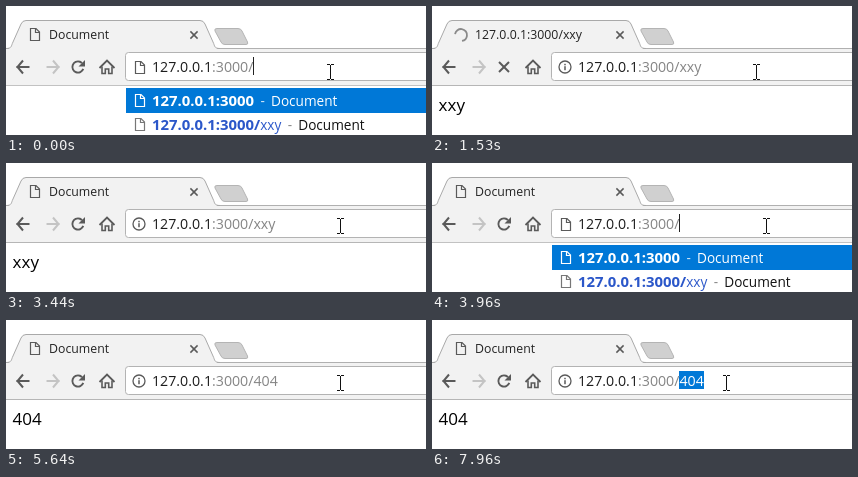
Write an HTML page with a canvas that moves like this. It is 420 by 129 pixels and loops after 8 s.

```html
<!DOCTYPE html>
<html lang="en">
<head>
<meta charset="utf-8">
<title>Address bar</title>
<style>
html, body { margin: 0; width: 420px; height: 129px; overflow: hidden; background: #fff; }
canvas { display: block; width: 420px; height: 129px; }
</style>
</head>
<body>
<canvas id="stage"></canvas>
<script>
const W = 420, H = 129, LOOP = 8000;
const BLUE = '#0078d7', DARK = '#5a5a5a', LINK = '#2b57c9';
const HOST = '127.0.0.1', BASE = HOST + ':3000', TEXT_X = 146;
const SANS = '"Open Sans", "Noto Sans", sans-serif';
const CJK = '"Noto Sans CJK SC", "Noto Sans CJK", sans-serif';
const URL_FONT = '14.2px ' + SANS;
const ROW_FONT = '13.6px ' + SANS;
const BOLD_FONT = 'bold 14.9px ' + SANS;

const canvas = document.getElementById('stage');
const ctx = canvas.getContext('2d');
const dpr = window.devicePixelRatio || 1;
canvas.width = W * dpr;
canvas.height = H * dpr;

const row = (path, title = 'Document') => ({ path, title });
const search = path => ({ path, search: true });
const LONG = row('/xxyssssssssss');

// Each entry overrides part of the state from its time onward.
const cues = [
  [0, { typed: '/', auto: '', rows: [row(''), row('/xxy')], caret: true, sel: null,
        page: '', tab: 'Document', load: false, secure: false, mouse: [324, 58] }],
  [310, { caret: false }],
  [590, { typed: '/x', auto: 'xy', rows: [row('/xxy'), LONG] }],
  [730, { typed: '/xx', auto: 'y' }],
  [880, { typed: '/xxy', auto: '' }],
  [1410, { rows: null, load: true }],
  [1530, { secure: true, tab: BASE + '/xxy', page: 'xxy' }],
  [1650, { load: false, tab: 'Document' }],
  [2490, { sel: [0, 18] }],
  [2630, { mouse: [334, 55] }],
  [2880, { sel: null, caret: true }],
  [3440, { caret: false }],
  [3590, { typed: '/xx', rows: [row('/xx', ''), row('/xxy')], caret: true, secure: false }],
  [3710, { typed: '/x', rows: [row('/x', ''), row('/xxy')] }],
  [3960, { typed: '/', rows: [row(''), row('/xxy')] }],
  [4360, { caret: false }],
  [4730, { typed: '/4', auto: '04', rows: [row('/404'), search('/4')] }],
  [5010, { typed: '/40', auto: '4', rows: [row('/404'), search('/40')] }],
  [5130, { typed: '/404', auto: '', rows: [row('/404'), search('/404')], caret: true }],
  [5380, { rows: null, caret: false, load: true }],
  [5520, { secure: true, tab: BASE + '/404', page: '404' }],
  [5640, { load: false, tab: 'Document' }],
  [6600, { mouse: [325, 55] }],
  [6720, { mouse: [305, 55] }],
  [6840, { mouse: [284, 55] }],
  [6990, { mouse: [268, 55] }],
  [7110, { mouse: [254, 55] }],
  [7270, { mouse: [253, 55] }],
  [7700, { mouse: [270, 55], sel: [15, 17] }],
  [7820, { mouse: [292, 55], sel: [15, 18] }],
  [7960, { mouse: [294, 55] }]
];

function stateAt(t) {
  const s = {};
  for (const [at, change] of cues) if (at <= t) Object.assign(s, change);
  return s;
}

function box(x, y, w, h, color) {
  ctx.fillStyle = color;
  ctx.fillRect(x, y, w, h);
}

// Draws text and returns the x where it ends.
function label(str, x, y, font, color) {
  ctx.font = font;
  ctx.fillStyle = color;
  ctx.fillText(str, x, y);
  return x + ctx.measureText(str).width;
}

function width(str, font) {
  ctx.font = font;
  return ctx.measureText(str).width;
}

// Strokes a polyline given as flat x, y pairs.
function line(pts, color, weight = 1, close = false) {
  ctx.beginPath();
  for (let i = 0; i < pts.length; i += 2) ctx.lineTo(pts[i], pts[i + 1]);
  if (close) ctx.closePath();
  ctx.strokeStyle = color;
  ctx.lineWidth = weight;
  ctx.stroke();
}

function arc(x, y, r, from, to, color, weight) {
  ctx.beginPath();
  ctx.arc(x, y, r, from, to);
  ctx.strokeStyle = color;
  ctx.lineWidth = weight;
  ctx.stroke();
}

function docIcon(x, y, color) {
  line([x + .5, y + .5, x + 6, y + .5, x + 9.5, y + 4, x + 9.5, y + 12.5, x + .5, y + 12.5], color, 1.2, true);
  line([x + 5.5, y + .5, x + 5.5, y + 4.5, x + 9.5, y + 4.5], color, 1.2);
}

function infoIcon(x, y) {
  arc(x, y, 6, 0, 7, DARK, 1.3);
  box(x - .75, y - 3.2, 1.5, 1.5, DARK);
  box(x - .75, y - .8, 1.5, 4, DARK);
}

function searchIcon(x, y) {
  arc(x - 1.5, y - 1.5, 3.6, 0, 7, '#777', 1.5);
  line([x + 1, y + 1, x + 5.5, y + 5.5], '#777', 1.8);
}

function cross(x, y, r, weight) {
  line([x - r, y - r, x + r, y + r], DARK, weight);
  line([x + r, y - r, x - r, y + r], DARK, weight);
}

function arrow(x, dir, color) {
  const tip = x - 6.5 * dir;
  line([tip, 61, x + 6.5 * dir, 61], color, 2);
  line([x, 54.5, tip + dir, 61, x, 67.5], color, 2);
}

function reloadIcon() {
  arc(72, 61, 5.6, .35, 5.5, DARK, 1.9);
  ctx.beginPath();
  ctx.moveTo(79, 54);
  ctx.lineTo(79, 60.5);
  ctx.lineTo(72.5, 60.5);
  ctx.fillStyle = DARK;
  ctx.fill();
}

function homeIcon() {
  line([93.5, 62, 101, 54.5, 108.5, 62], DARK, 1.8);
  line([96, 60.5, 96, 67.5, 99.3, 67.5, 99.3, 63, 102.7, 63, 102.7, 67.5, 106, 67.5, 106, 60.5], DARK, 1.6);
}

function frame(s, t) {
  box(0, 42, W, 38, '#f2f2f2');
  line([0, 42.5, W, 42.5], '#b0b0b0');

  ctx.beginPath();
  ctx.moveTo(0, 42.5);
  ctx.bezierCurveTo(6, 42.5, 5, 40, 7, 36);
  ctx.lineTo(15, 18);
  ctx.quadraticCurveTo(16.5, 14.5, 20, 14.5);
  ctx.lineTo(194, 14.5);
  ctx.quadraticCurveTo(197.5, 14.5, 199, 18);
  ctx.lineTo(207, 36);
  ctx.bezierCurveTo(209, 40, 208, 42.5, 214, 42.5);
  ctx.fillStyle = '#f2f2f2';
  ctx.fill();
  box(3, 42, 208, 1, '#f2f2f2');
  ctx.strokeStyle = '#a9a9a9';
  ctx.lineWidth = 1;
  ctx.stroke();

  ctx.beginPath();
  ctx.moveTo(211, 22.5);
  ctx.lineTo(232, 22.5);
  ctx.quadraticCurveTo(235, 22.5, 236, 25);
  ctx.lineTo(241.5, 36);
  ctx.quadraticCurveTo(242.5, 38.5, 240, 38.5);
  ctx.lineTo(219, 38.5);
  ctx.quadraticCurveTo(216, 38.5, 215, 36);
  ctx.lineTo(209, 25);
  ctx.quadraticCurveTo(208, 22.5, 211, 22.5);
  ctx.fillStyle = '#d0d0d0';
  ctx.fill();
  ctx.strokeStyle = '#b4b4b4';
  ctx.stroke();

  if (s.load) {
    const a = t / 160;
    arc(29, 29, 6, a, a + 4.4, '#8a8a8a', 1.8);
  } else docIcon(24, 22, DARK);
  label(s.tab, 43, 33, '12.3px ' + SANS, '#222');
  cross(188, 29, 3.6, 1.5);

  arrow(17, 1, DARK);
  arrow(47, -1, '#c4c4c4');
  if (s.load) cross(72, 61, 5, 2);
  else reloadIcon();
  homeIcon();

  ctx.beginPath();
  ctx.roundRect(119.5, 46.5, 310, 28, 3);
  ctx.fillStyle = '#fff';
  ctx.fill();
  ctx.strokeStyle = '#b3b3b3';
  ctx.lineWidth = 1;
  ctx.stroke();
  box(0, 79, W, 1, s.rows ? '#c2c2c2' : '#b6b6b6');
}

function address(s) {
  if (s.secure) infoIcon(133, 61);
  else docIcon(129, 55, DARK);

  const url = BASE + s.typed + s.auto;
  const end = label(HOST, TEXT_X, 66, URL_FONT, '#1c1c1c');
  label(url.slice(HOST.length), end, 66, URL_FONT, '#858585');

  const sel = s.auto ? [url.length - s.auto.length, url.length] : s.sel;
  if (sel) {
    const x0 = Math.round(TEXT_X + width(url.slice(0, sel[0]), URL_FONT));
    const x1 = Math.round(TEXT_X + width(url.slice(0, sel[1]), URL_FONT));
    box(x0, 51, x1 - x0, 18, BLUE);
    ctx.save();
    ctx.beginPath();
    ctx.rect(x0, 51, x1 - x0, 18);
    ctx.clip();
    label(url, TEXT_X, 66, URL_FONT, '#fff');
    ctx.restore();
  }
  if (s.caret) box(Math.round(TEXT_X + width(url, URL_FONT)), 51, 1, 18, '#222');
}

function suggestion(r, y, active, typed) {
  if (active) box(120, y - 18, 300, 25, BLUE);
  const full = BASE + r.path;
  let end;
  if (r.search) {
    searchIcon(133, y - 5);
    end = label(full, TEXT_X, y, URL_FONT, '#111');
  } else {
    docIcon(129, y - 12, active ? '#fff' : '#777');
    const cut = Math.min(full.length, BASE.length + typed.length);
    const color = active ? '#fff' : LINK;
    end = label(full.slice(0, cut), TEXT_X, y, BOLD_FONT, color);
    end = label(full.slice(cut), end, y, ROW_FONT, color);
  }
  const title = r.search ? '苔屿搜索 搜索' : r.title;
  if (!title) return;
  label('-', end + 6.5, y, ROW_FONT, active ? '#cfe5f7' : '#888');
  const color = active ? '#fff' : r.search ? '#888' : '#111';
  label(title, end + 17, y, r.search ? '14px ' + CJK : ROW_FONT, color);
}

function pointer([x, y]) {
  const c = '#111';
  box(x - 3, y, 3, 1, c);
  box(x + 1, y, 3, 1, c);
  box(x, y + 1, 1, 14, c);
  box(x - 3, y + 15, 3, 1, c);
  box(x + 1, y + 15, 3, 1, c);
}

function draw() {
  const t = performance.now() % LOOP;
  const s = stateAt(t);
  ctx.setTransform(dpr, 0, 0, dpr, 0, 0);
  box(0, 0, W, H, '#fff');
  frame(s, t);
  address(s);
  if (s.rows) s.rows.forEach((r, i) => suggestion(r, 100 + 24 * i, i === 0, s.typed));
  else label(s.page, 6.6, 105, '17px ' + SANS, '#000');
  pointer(s.mouse);
  requestAnimationFrame(draw);
}
requestAnimationFrame(draw);
</script>
</body>
</html>
```
